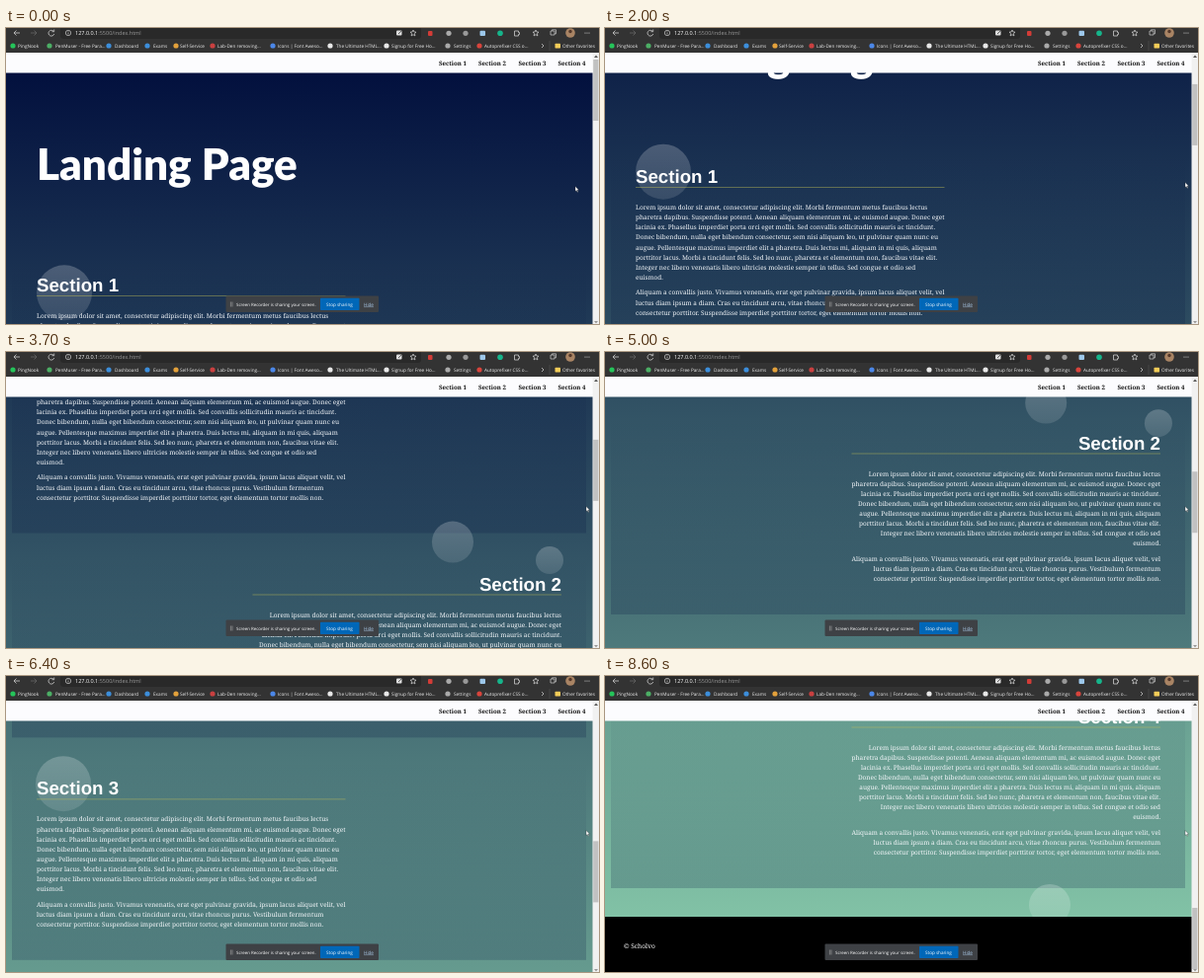
An HTML page that plays this animation: 600 by 300 pixels, repeating every 8700 ms.

```html
<!DOCTYPE html>
<html lang="en">
<head>
<meta charset="utf-8">
<title>Landing Page</title>
<style>
html, body { margin: 0; width: 100%; height: 100%; overflow: hidden; background: #000; }
svg { display: block; width: 100vw; height: 100vh; }
text { text-rendering: geometricPrecision; white-space: pre; }
.serif { font-family: "Noto Serif", serif; }
.ui { font-family: "Open Sans", "Noto Sans", sans-serif; }
.heading { font: bold 18.7px "Liberation Sans", Arial, sans-serif; }
.title { font: 900 44px Lato, sans-serif; }
</style>
</head>
<body>
<svg id="stage" viewBox="0 0 600 300">
  <defs>
    <linearGradient id="sky" x1="0" y1="0" x2="0" y2="1">
      <stop offset="0" stop-color="#000d3c"/><stop offset="1" stop-color="#88cbab"/>
    </linearGradient>
    <linearGradient id="shade" x1="0" y1="0" x2="0" y2="1">
      <stop offset="0" stop-color="#000d3c" stop-opacity="0"/><stop offset="1" stop-color="#000d3c" stop-opacity=".2"/>
    </linearGradient>
    <linearGradient id="bubble" x1="0" y1="0" x2="0" y2="1">
      <stop offset="0" stop-color="#fff" stop-opacity=".22"/><stop offset="1" stop-color="#fff" stop-opacity=".12"/>
    </linearGradient>
  </defs>
  <g id="page"></g>
  <g id="frame"></g>
</svg>
<script>
const LOOP = 8700, STEP = 100;
const SECTION_GAP = 225.5, FIRST_HEADING = 260, MAX_SCROLL = 896;
const page = document.getElementById("page");
const frame = document.getElementById("frame");

function add(parent, tag, attrs, content) {
  const node = document.createElementNS("http://www.w3.org/2000/svg", tag);
  for (const key in attrs) node.setAttribute(key, attrs[key]);
  if (content) node.textContent = content;
  parent.appendChild(node);
  return node;
}
const rect = (parent, x, y, width, height, fill, rx = 0) =>
  add(parent, "rect", { x, y, width, height, fill, rx });
const dot = (parent, cx, cy, r, fill) => add(parent, "circle", { cx, cy, r, fill });
const line = (parent, d, stroke, width = 0.8) =>
  add(parent, "path", { d, stroke, fill: "none", "stroke-width": width });
const label = (parent, x, y, size, content, fill = "#fff", cls = "ui", extra = {}) =>
  add(parent, "text", { x, y, "font-size": size, fill, class: cls, ...extra }, content);

const paragraphs = [
  [32, [
    "Lorem ipsum dolor sit amet, consectetur adipiscing elit. Morbi fermentum metus faucibus lectus",
    "pharetra dapibus. Suspendisse potenti. Aenean aliquam elementum mi, ac euismod augue. Donec eget",
    "lacinia ex. Phasellus imperdiet porta orci eget mollis. Sed convallis sollicitudin mauris ac tincidunt.",
    "Donec bibendum, nulla eget bibendum consectetur, sem nisi aliquam leo, ut pulvinar quam nunc eu",
    "augue. Pellentesque maximus imperdiet elit a pharetra. Duis lectus mi, aliquam in mi quis, aliquam",
    "porttitor lacus. Morbi a tincidunt felis. Sed leo nunc, pharetra et elementum non, faucibus vitae elit.",
    "Integer nec libero venenatis libero ultricies molestie semper in tellus. Sed congue et odio sed",
    "euismod."]],
  [118.3, [
    "Aliquam a convallis justo. Vivamus venenatis, erat eget pulvinar gravida, ipsum lacus aliquet velit, vel",
    "luctus diam ipsum a diam. Cras eu tincidunt arcu, vitae rhoncus purus. Vestibulum fermentum",
    "consectetur porttitor. Suspendisse imperdiet porttitor tortor, eget elementum tortor mollis non."]]
];

// Scrolling page
rect(page, 0, 25, 594, 1171, "url(#sky)");
label(page, 31, 154, 44, "Landing Page", "#fff", "title");

// start: when a section turns active; angles are in degrees at that moment
const sections = [
  { start: -3000, tailAngle: 60.4 }, { start: 3100 }, { start: 5500 }, { start: 6800, tailAngle: 220 }
];
sections.forEach((section, i) => {
  const y = FIRST_HEADING + i * SECTION_GAP, right = i % 2 === 1;
  const x = right ? 562 : 31, anchor = { "text-anchor": right ? "end" : "start" };
  const body = add(page, "g", {});
  section.box = rect(body, 6, y - 28, 581, 202.5, "url(#shade)");
  section.orbits = [{
    node: dot(body, 0, 0, right ? 14 : 28, "url(#bubble)"),
    x: right ? 553.7 : 59, y: right ? y - 18.3 : y + 2, radius: 6.3, angle: 180, speed: 90
  }];
  if (section.tailAngle !== undefined) section.orbits.push({
    node: dot(body, 0, 0, 21, "url(#bubble)"),
    x: 450, y: y + 187.3, radius: 4.2, angle: section.tailAngle, speed: -72
  });
  label(body, x, y + 7, 18.7, "Section " + (i + 1), "#fff", "heading", anchor);
  line(body, `M${right ? 249.5 : 31} ${y + 11.5}h312.5`, "rgba(200,195,85,.6)", 0.7);
  for (const [top, lines] of paragraphs)
    lines.forEach((content, row) =>
      label(body, x, y + top + 2.1 + row * 10.1, 6.45, content, "#f4f7fa", "serif", anchor));
});
rect(page, 0, 1140, 594, 60, "#000");
label(page, 19, 1172.3, 6.6, "© Scholvo", "#fff", "serif");

// Site navigation and scrollbar
rect(frame, 0, 25, 594, 20.5, "#fcfcfe");
[438, 478, 518.5, 558.5].forEach((x, i) =>
  label(frame, x, 38.2, 6.15, "Section " + (i + 1), "#111", "serif", { "font-weight": "bold" }));
rect(frame, 593.5, 25, 6.5, 275, "#f1f1f1");
add(frame, "path", { d: "M595 30l2-2.4 2 2.4z", fill: "#555" });
add(frame, "path", { d: "M595 297l2 2.4 2-2.4z", fill: "#999" });
const thumb = rect(frame, 594.2, 32, 5.2, 62, "#c1c1c1");

// Browser toolbar
rect(frame, 0, 0, 600, 25, "#333");
rect(frame, 55, -4, 365, 15, "#292929", 3);
line(frame, "M14 5H8m2.5-2.5L8 5l2.5 2.5", "#ccc");
line(frame, "M25 5h6m-2.5-2.5L31 5l-2.5 2.5", "#666");
line(frame, "M48 3.2a2.9 2.9 0 1 0 .7 2.8M48.7 1.5v2.2h-2.2", "#ccc");
line(frame, "M60.3 5a2.7 2.7 0 1 0 5.4 0a2.7 2.7 0 1 0-5.4 0M63 4.5v2M63 3v.6", "#ccc", 0.7);
const url = label(frame, 70, 7.2, 5.5, "", "#fff");
add(url, "tspan", {}, "127.0.0.1");
add(url, "tspan", { fill: "#999" }, ":5500/index.html");
rect(frame, 395, 2.5, 5.5, 5, "#ddd", 1);
line(frame, "M397 6l4-4", "#444");
const star = x => line(frame, `M${x} 2l.9 2 2.1.2-1.6 1.5.5 2.2-1.9-1.2-1.9 1.2.5-2.2-1.6-1.5 2.1-.2z`, "#ddd", 0.7);
star(412);
rect(frame, 427, 3, 4.5, 5, "#d33c37", 1);
dot(frame, 448, 5.3, 2.6, "#aaa");
dot(frame, 465, 5.3, 2.6, "#999");
rect(frame, 479.5, 2.7, 5.5, 5.2, "#9cc7ea", 1);
dot(frame, 500, 5.3, 2.8, "#16b58b");
line(frame, "M514.5 3h4v1.5h1v2h-1v1.5h-4z", "#ccc");
star(536);
line(frame, "M551 3h4v4h-4zM552.5 3V1.8h4v4H555", "#ccc", 0.7);
dot(frame, 571, 5, 4.8, "#a98464");
dot(frame, 571, 3.5, 1.7, "#55392c");
[586, 588, 590].forEach(x => dot(frame, x, 5, 0.55, "#ddd"));

// Bookmarks: icon x, icon colour, text x, text
[
  [7, "#25c45a", 12, "PingNook"],
  [44, "#4caf65", 50, "PenMuser - Free Para..."],
  [104, "#3c8edb", 110, "Dashboard"],
  [143, "#3c8edb", 149, "Exams"],
  [172, "#e3a13b", 176, "Self-Service"],
  [209, "#c94040", 214, "Lab-Den removing..."],
  [270, "#4b87e8", 275, "Icons | Font Aweso..."],
  [328, "#e8e8e8", 334, "The Ultimate HTML..."],
  [385, "#e8e8e8", 390, "Signup for Free Ho..."],
  [447, "#aaa", 453, "Settings"],
  [479, "#d8443c", 484, "Autoprefixer CSS o..."]
].forEach(([iconX, color, x, content]) => {
  dot(frame, iconX, 18, 2.6, color);
  label(frame, x, 19.8, 4.7, content, "#eee");
});
line(frame, "M542 16l2 2-2 2", "#ddd", 0.7);
line(frame, "M550 13v10", "#555", 0.6);
rect(frame, 555.5, 15.8, 5.5, 4.6, "#f3cc58", 0.6);
label(frame, 563, 19.8, 4.7, "Other favorites", "#eee");

// Sharing notice
rect(frame, 222.5, 271.5, 154.5, 16.5, "#3e4145", 1);
line(frame, "M227.4 277.5v5M229 277.5v5", "#aaa", 0.6);
label(frame, 233, 281.6, 4.4, "Screen Recorder is sharing your screen.");
rect(frame, 318, 273.8, 39.5, 12.2, "#0067b8", 0.8);
label(frame, 324, 281.6, 4.6, "Stop sharing");
label(frame, 362, 281.6, 4.6, "Hide", "#a9c8e8", "ui", { "text-decoration": "underline" });

const cursor = add(frame, "path", {
  d: "M0 0v5l1.2-1 .9 1.9.8-.4-.9-1.8h1.6z", fill: "#fff", stroke: "#111", "stroke-width": 0.3
});

const clamp = v => Math.max(0, Math.min(1, v));
const scrollKeys = [[0, 0], [2000, 110], [3700, 251], [5000, 394], [5700, 460], [7200, 752], [8600, MAX_SCROLL]];

// Smooth Hermite curve through the scroll keys, at rest at both ends
function scrollAt(t) {
  const last = scrollKeys.length - 1;
  if (t >= scrollKeys[last][0]) return MAX_SCROLL;
  const slope = i => i === 0 || i === last ? 0 :
    (scrollKeys[i + 1][1] - scrollKeys[i - 1][1]) / (scrollKeys[i + 1][0] - scrollKeys[i - 1][0]);
  const i = scrollKeys.findIndex((key, k) => t < scrollKeys[k + 1][0]);
  const [t0, y0] = scrollKeys[i], [t1, y1] = scrollKeys[i + 1];
  const span = t1 - t0, u = (t - t0) / span, v = 1 - u;
  return y0 * v * v * (1 + 2 * u) + y1 * u * u * (3 - 2 * u)
    + span * u * v * (slope(i) * v - slope(i + 1) * u);
}

function draw(t) {
  const scroll = scrollAt(t);
  page.setAttribute("transform", `translate(0 ${-scroll})`);
  thumb.setAttribute("y", 32 + scroll * 203 / MAX_SCROLL);
  for (const { start, box, orbits } of sections) {
    const age = t - start, shown = clamp(age / 300);
    box.setAttribute("opacity", shown);
    for (const { node, x, y, radius, angle, speed } of orbits) {
      const a = (angle + speed * age / 1000) * Math.PI / 180;
      node.setAttribute("cx", x + radius * Math.cos(a));
      node.setAttribute("cy", y + radius * Math.sin(a));
      node.setAttribute("opacity", shown);
    }
  }
  const move = clamp((t - 200) / 600), eased = move * move * (3 - 2 * move);
  cursor.setAttribute("transform", `translate(${576 + 11 * eased} ${160.5 - 4 * eased})`);
}

const begin = performance.now();
function tick() {
  const t = (performance.now() - begin) % LOOP;
  draw(Math.floor(t / STEP) * STEP);
  requestAnimationFrame(tick);
}
tick();
</script>
</body>
</html>
```
